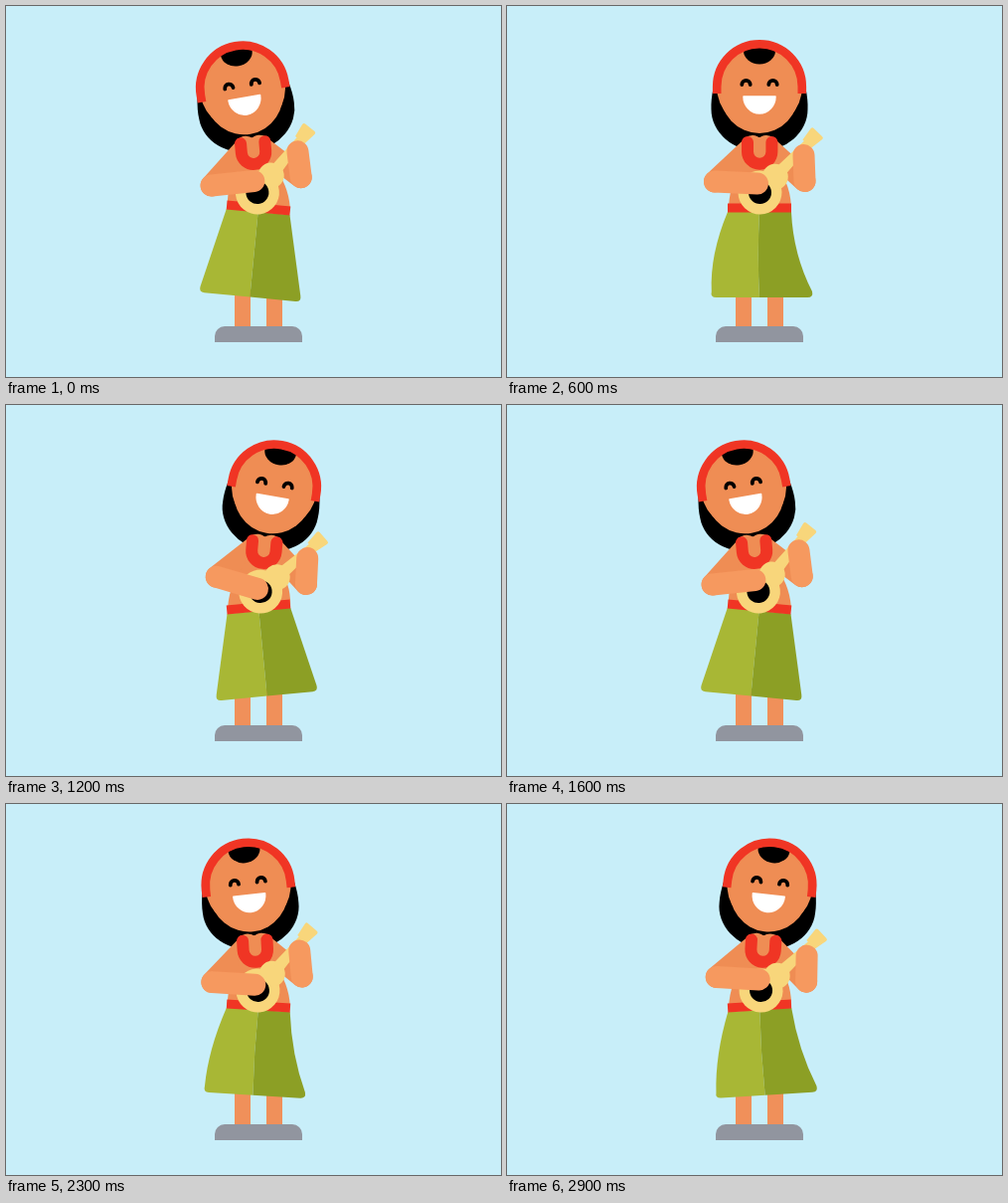
An HTML page that plays this animation: 498 by 373 pixels, repeating every 3 s.

```html
<!DOCTYPE html>
<html lang="en">
<head>
<meta charset="utf-8">
<title>Dancer with ukulele</title>
<style>
  html, body { margin: 0; width: 100%; height: 100%; overflow: hidden; background: #c8eef9; }
  svg { display: block; width: 100vw; height: 100vh; }
  .skin { fill: #ef8d54; }
  .limb { fill: none; stroke: #ef8d54; stroke-width: 22; stroke-linecap: round; }
  .front { stroke: #f6995f; }
  .red { fill: none; stroke: #f03524; }
  .wood { fill: #f8d67b; }
</style>
</head>
<body>
<svg viewBox="0 0 498 373">
  <rect width="498" height="373" fill="#c8eef9"/>

  <path d="M230 280h16v44h-16zM262 280h16v44h-16z" fill="#f0905a"/>
  <path d="M210 338v-6a10 10 0 0 1 10-10h68a10 10 0 0 1 10 10v6z" fill="#91959f"/>

  <g class="head">
    <path transform="translate(254 81)"
      d="M-46.5 2Q-49 14 -48.5 23A48.5 42 0 0 0 48.5 23Q49 14 46.5 2z"/>
  </g>

  <g class="torso">
    <path class="limb" d="M209 176.5L247 141M261 141L299.5 176"/>
    <path class="skin" d="M239 132H269L272 163Q286 180 286 206H223Q223 180 236 163z"/>
    <path class="red" stroke-width="12" stroke-linecap="round"
      d="M242 137V146.5A12.2 12.2 0 0 0 266.4 146.5V137"/>
  </g>

  <g id="hips">
    <path id="skirtL" fill="#a8b735"/>
    <path id="skirtR" fill="#8c9f25"/>
    <path class="red" stroke-width="9" d="M222 203H286"/>
  </g>

  <g class="torso">
    <g class="wood" transform="translate(254.5 187.5) rotate(-46)">
      <circle r="22"/>
      <circle cx="22" r="13"/>
      <path d="M30 -6L68 -4V-6L82 -8Q84 -8 84 -6V6Q84 8 82 8L68 6V4L30 6z"/>
      <circle r="11.5" fill="#000"/>
    </g>
    <path class="limb front" stroke-width="24" d="M298.5 150L299.5 176"/>
    <path id="forearm" class="limb front" d="M209 176.5h43"/>
  </g>

  <g class="head">
    <g transform="translate(254 81)">
      <circle class="skin" r="43"/>
      <ellipse class="skin" cy="5" rx="40" ry="42"/>
      <path d="M-16 -36A39 39 0 0 1 16 -36A16 13.5 0 0 1 -16 -36z"/>
      <path class="red" stroke-width="8.6" d="M-42.8 7V0A42.8 42.8 0 0 1 42.8 0V7"/>
      <path d="M-17.7 -2a4.2 4.2 0 0 1 8.4 0M9.3 -2a4.2 4.2 0 0 1 8.4 0"
        fill="none" stroke="#000" stroke-width="3.8" stroke-linecap="round"/>
      <path d="M-16 10H16A16 17 0 0 1 -16 10z"
        fill="#fff" stroke="#fff" stroke-width="1.5" stroke-linejoin="round"/>
    </g>
  </g>
</svg>

<script>
const LOOP = 3000, STEP = 100, SWAY = 800, STRUM = 320;
const TAU = Math.PI * 2;
const heads = document.querySelectorAll('.head');
const torsos = document.querySelectorAll('.torso');
const [hips, skirtL, skirtR, forearm] =
  ['hips', 'skirtL', 'skirtR', 'forearm'].map(id => document.getElementById(id));

function turn(el, angle, x, y) {
  el.setAttribute('transform', `rotate(${angle.toFixed(3)} ${x} ${y})`);
}

// One half of the skirt: its edges bow toward the direction of travel, the hem trails.
function skirtHalf(side, bend) {
  const x = d => 254 + side * d;
  const hemX = d => x(d) - bend * 0.3;
  const hem = 293;
  return `M254 207H${x(32)}Q${x(42) + bend} 250 ${hemX(50.6)} ${hem - 6}` +
    `Q${hemX(52)} ${hem} ${hemX(46)} ${hem}H254Q${254 + bend * 0.3} 250 254 207z`;
}

function draw(t) {
  const phase = TAU * t / SWAY;
  // The small third harmonic makes the swing a little more even than a pure sine.
  const sway = -(Math.cos(phase) + 0.04 * Math.cos(3 * phase)) / 1.04;
  const bend = 8 * Math.sin(phase);
  heads.forEach(el => turn(el, 10 * sway, 254, 173));
  torsos.forEach(el => turn(el, 5 * sway, 254, 206));
  turn(hips, -5.5 * sway, 254, 203);
  skirtL.setAttribute('d', skirtHalf(-1, bend));
  skirtR.setAttribute('d', skirtHalf(1, bend));
  turn(forearm, 11.5 - 12.5 * Math.cos(TAU * t / STRUM), 209, 176.5);
}

const start = performance.now();
function tick() {
  const t = (performance.now() - start) % LOOP;
  draw(Math.floor(t / STEP) * STEP);
  requestAnimationFrame(tick);
}
tick();
</script>
</body>
</html>
```
